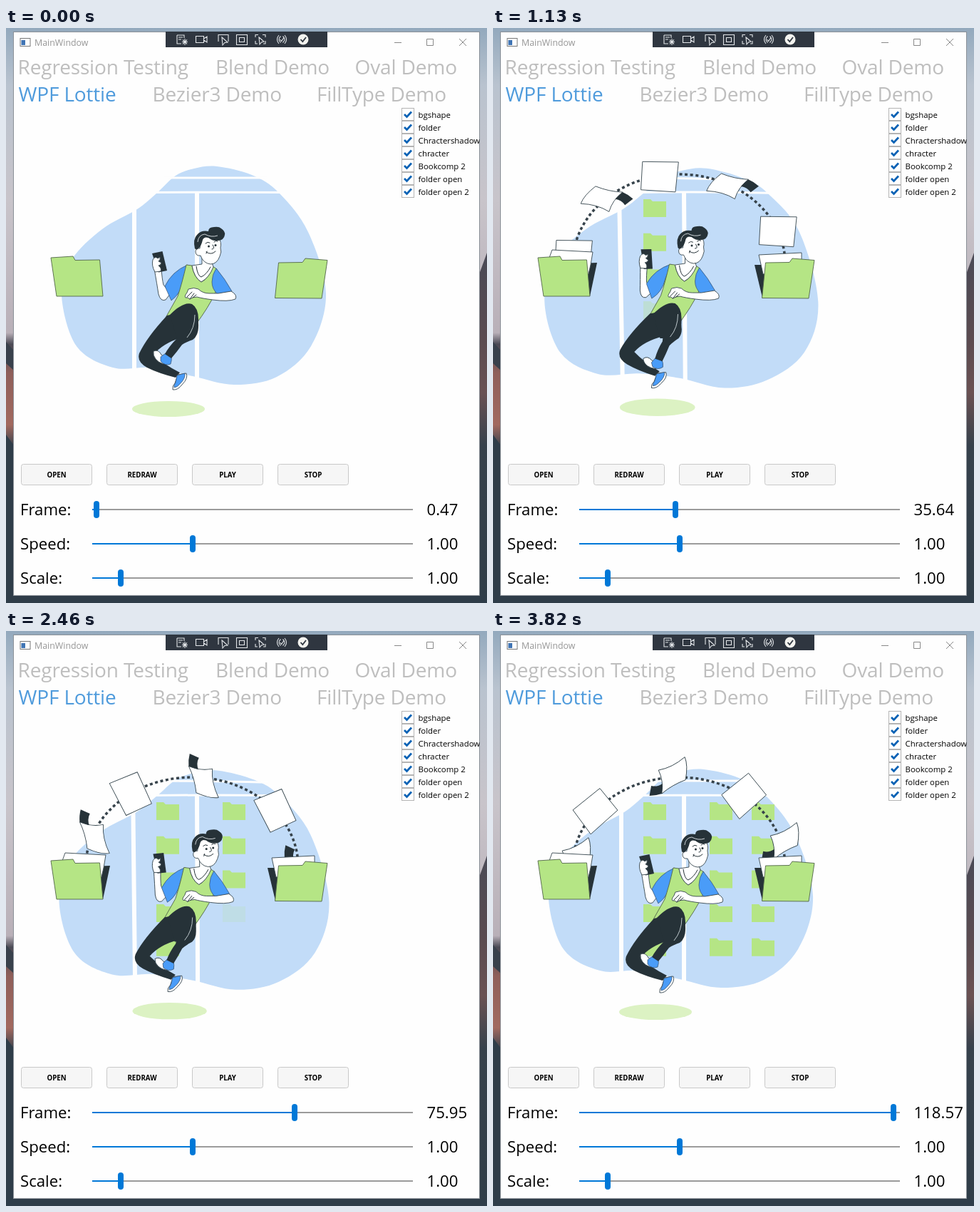
These frames come from a looping animation (675 by 806 pixels, 3.86 s). An HTML page:

```html
<!DOCTYPE html>
<html lang="en">
<head>
<meta charset="utf-8">
<title>MainWindow</title>
<style>
  html, body { margin: 0; width: 100%; height: 100%; overflow: hidden; }
  svg { display: block; width: 675px; height: 806px; font-family: "Open Sans", "Noto Sans", sans-serif; }
  .tab { font-size: 28px; letter-spacing: -.15px; fill: #bebebe; }
  .label { font-size: 22.2px; fill: #000; }
  .item { font-size: 11.4px; fill: #000; }
  .btn { font-size: 9.7px; font-weight: 700; fill: #000; text-anchor: middle; }
  .line { fill: none; stroke: #263238; stroke-width: 1; stroke-linecap: round; }
  .skin { fill: #fff; stroke: #37474f; stroke-width: .9; stroke-linejoin: round; }
  .green { fill: #b5e585; stroke: #52664a; stroke-width: .9; stroke-linejoin: round; }
  .blue { fill: #4a9cf8; stroke: #37506b; stroke-width: .7; stroke-linejoin: round; }
  .dark { fill: #263238; }
  .bar { fill: none; stroke: #fefefe; }
</style>
</head>
<body>
<svg viewBox="0 0 675 806">
  <defs>
    <linearGradient id="sky" x2="0" y2="1">
      <stop offset="0" stop-color="#93a9bd"/><stop offset=".1" stop-color="#b9c3cf"/>
      <stop offset=".3" stop-color="#c8c4ca"/><stop offset=".53" stop-color="#b9b0b8"/>
      <stop offset=".55" stop-color="#4b4a55"/><stop offset=".6" stop-color="#8f5f5a"/>
      <stop offset=".69" stop-color="#a2695f"/><stop offset=".73" stop-color="#34404c"/>
      <stop offset=".86" stop-color="#2c3f4d"/><stop offset="1" stop-color="#34444f"/>
    </linearGradient>
    <linearGradient id="ridge" x2="0" y2="1">
      <stop offset="0" stop-color="#4a4a56"/><stop offset=".25" stop-color="#5b4b50"/>
      <stop offset=".4" stop-color="#6a5153"/><stop offset=".55" stop-color="#36414c"/>
      <stop offset="1" stop-color="#2f3d48"/>
    </linearGradient>
    <g id="flat"><path class="skin" d="M-20,-26L22,-23L20.500,25.500L-19,24.500Z"/></g>
    <g id="curl">
      <path class="skin" d="M8,35Q-4,31 -17,15Q-10,-4 -10,-23Q2,-9 18,-5Q8,12 8,35Z"/>
      <path class="dark" d="M-10,-23Q-7,-31 -1,-38L8,-27Q1,-22 0,-13Q-5,-18 -10,-23Z"/>
    </g>
    <path id="mini" fill="#b5e585" d="M0,0H10L13,3H32V25H0Z"/>
    <clipPath id="win"><rect x="11" y="6" width="653.5" height="790"/></clipPath>
  </defs>

  <rect width="675" height="806" fill="url(#sky)"/>
  <path fill="url(#ridge)" d="M664,345L675,315V806H664Z"/>
  <path fill="#2f3d49" d="M0,570L11,585V806H0ZM0,796H675V806H0Z"/>
  <path fill="#39414c" d="M0,440L11,452V480L0,470Z"/>
  <rect x="10.5" y="5.5" width="654" height="790" fill="#fefefe" stroke="#8a9097"/>

  <rect x="20" y="14.5" width="14" height="11" fill="#fff" stroke="#777"/>
  <rect x="21.5" y="17" width="5.5" height="7" fill="#3f74b4"/>
  <text x="40" y="25" font-size="12.4" fill="#969696">MainWindow</text>
  <path fill="none" stroke="#888" d="M545,20.5H555M590.5,15.5H599.5V24.5H590.5ZM636,15L646,25M646,15L636,25"/>

  <rect x="224" y="5" width="227" height="22" fill="#2f3640"/>
  <g fill="none" stroke="#e2e5e8" stroke-width="1.1">
    <path d="M240,10H250V14M240,10V22H246M242,13H248M242,16H246M251,15V24M247,19.5H255M248,16.5L254,22.5M254,16.5L248,22.5"/>
    <path d="M266.5,11.5H277.5V20.5H266.5ZM277.5,15L282,12V20L277.5,17"/>
    <path d="M298,19V9.5H312V19M303,13L311,20L307,20.5L304,24Z"/>
    <path d="M323.5,9.5H338.5V23.5H323.5ZM327.5,13.5H334.5V19.5H327.5Z"/>
    <path d="M350,13V9.5H354M360,9.5H364V13M350,18V22H353M364,18V22H361M355,13L362,19L358.5,20L356,23Z"/>
    <path d="M383,10Q378,16 383,22M391,10Q396,16 391,22M385.500,11.500Q380.500,16 385.500,20.500M388.500,11.500Q393.500,16 388.500,20.500M384.500,16L386.500,18.500L390,13.500"/>
  </g>
  <circle cx="417" cy="16" r="7.5" fill="#f3f3ef"/>
  <path d="M413.500,16L416.300,19L421,13" fill="none" stroke="#2f3640" stroke-width="1.8"/>

  <g class="tab">
    <text x="16.500" y="65">Regression Testing</text><text x="294" y="65">Blend Demo</text><text x="489.500" y="65">Oval Demo</text>
    <text x="17.500" y="103" style="fill:#4f9bdc">WPF Lottie</text><text x="205.500" y="103">Bezier3 Demo</text><text x="436" y="103">FillType Demo</text>
  </g>

  <path id="blob" fill="#c2dcf8"/>
  <g id="shelf"></g>
  <path id="bars" class="bar" stroke-width="6"/>
  <path id="rails" class="bar" stroke-width="3"/>
  <path id="arc" fill="none" stroke="#37434b" stroke-width="3.500" stroke-dasharray="4 3.600"/>

  <path id="flapL" class="dark"/>
  <path id="flapR" class="dark"/>
  <g id="papers"></g>
  <path id="sheetL" class="skin" d="M79,322L83,311L140,314L137,332L134,345H81Z"/>
  <path id="sheetR" class="skin" d="M373,318L433,315V345H379Z"/>
  <path class="green" d="M63,322L94,320L97,325.500L131.500,325L136,376H71Z"/>
  <path class="green" d="M382.500,329L416,328.500L420,323L451,325.500L443,379L377.500,378.500Z"/>

  <ellipse id="shade" fill="#dcf2c3"/>

  <g id="body">
    <g id="arm">
      <g id="fore">
        <path class="skin" d="M208,337Q212,360 214,373Q217,384 224,381L231,372L221,360Q219,352 218,337Z"/>
        <path class="dark" d="M205,316L219.500,313L226,340L214,342.500Z"/>
        <path class="skin" d="M206,325Q209,319 213,323L216,321Q217,325 214,327L218,329Q217,333 214,333Q219,337 217,341L209,342Q204,333 206,325Z"/>
      </g>
      <path class="blue" d="M255,332Q233,341 223,362L232,382Q246,372 249,352Z"/>
    </g>
    <path class="green" d="M253,332Q247,358 241,376L224,406L266,416Q284,392 294,371Q292,350 296,338L290,334Q284,352 274,356Q264,350 261,333Z"/>
    <g id="backLeg">
      <path class="dark" d="M226,403Q198,433 187,456Q183,468 198,476Q214,484 238,490L244,483Q222,472 207,458Q220,442 246,434L262,395Z"/>
      <path class="skin" d="M241,486L253,484Q256,491 247,500Q241,508 234,507Q233,502 237,498Z"/>
      <path class="blue" d="M240,487L251,484Q252,491 245,498Q240,504 236,504Q235,501 238,497Z"/>
    </g>
    <g id="calf">
      <path class="skin" d="M207,453Q214,450 218,458L226,465L221,471Q214,469 210,464Q206,459 207,453Z"/>
      <path class="blue" d="M217,461L224,456L232,459Q233,466 231,471Q223,474 217,467Z"/>
      <path class="dark" d="M270,414Q271,431 262,437Q253,440 247,444Q239,455 232,463L223,457Q229,446 239,436L248,410Z"/>
    </g>
    <path class="dark" d="M230,402Q249,383 261,387Q271,393 270,412Q270,430 262,436L240,436Z"/>
    <path d="M265,402Q265,421 254,434" fill="none" stroke="#cfd8dc" stroke-width=".9"/>
    <path class="skin" d="M275,322V331L261,333Q264,350 274,356Q285,350 291,335L288,326Z"/>
    <path class="line" stroke-width=".8" d="M267,334Q269,348 274,349Q282,345 287,335"/>
    <path class="blue" d="M295,337Q307,351 317,369L297,373Q289,366 289,356Q289,346 295,337Z"/>
    <path class="skin" d="M298,372L316,369Q325,374 322,380Q312,384 290,381Q275,379 268,377Q262,377 258,380L255,378L252,378Q250,376 254,371L256,366Q264,363 270,366Q276,372 285,372Z"/>
    <path class="line" d="M254,377L261,370M258,380L264,372M262,378L267,374"/>
    <path class="skin" d="M274,292L298,294Q303,300 301,308Q303,314 300,320Q296,331 287,331Q277,330 273,319Q266,320 266,313Q267,308 272,309Z"/>
    <path class="dark" d="M265,309Q262,296 268,290Q274,283 284,285Q284,279 292,279Q299,278 302,281Q308,285 307,290Q306,297 298,298Q290,299 284,294Q278,292 276,297Q274,306 270,309Q267,312 265,309Z"/>
    <path d="M269,300Q270,290 279,289Q288,294 297,291" fill="none" stroke="#dfe5e8" stroke-width=".9"/>
    <path class="line" d="M280,302Q283,299 286,301M292,300Q295,297 297,299M290,304Q294,310 289,310M281,314Q288,319 294,313M282,313L281,316"/>
    <circle cx="284.500" cy="306" r="1.500" class="dark"/><circle cx="294" cy="304.500" r="1.500" class="dark"/>
  </g>

  <g id="ui" clip-path="url(#win)"></g>
</svg>
<script>
const LOOP = 3860, STEP = 40.6, LAST = 94;
const $ = id => document.getElementById(id);
const set = (id, attrs) => { for (const k in attrs) $(id).setAttribute(k, attrs[k]); };
const clamp = x => Math.max(0, Math.min(1, x));
const smooth = x => { x = clamp(x); return x * x * (3 - 2 * x); };
const mix = (a, b, u) => a + (b - a) * u;

// piecewise linear, extended past both ends
function interp(xs, ys, x) {
  let i = 0;
  while (i < xs.length - 2 && x > xs[i + 1]) i++;
  return mix(ys[i], ys[i + 1], (x - xs[i]) / (xs[i + 1] - xs[i]));
}

// check list, buttons and sliders
const names = ['bgshape', 'folder', 'Chractershadow', 'chracter', 'Bookcomp 2', 'folder open', 'folder open 2'];
let ui = names.map((n, i) => `<g transform="translate(0 ${i * 18})">
  <rect x="555.5" y="112.5" width="17" height="17" fill="#fff" stroke="#b4b4b4"/>
  <path d="M559,121L562.5,124.500L569,117.500" fill="none" stroke="#0a62b5" stroke-width="2.800"/>
  <text class="item" x="578.5" y="126">${n}</text></g>`).join('');
ui += ['OPEN', 'REDRAW', 'PLAY', 'STOP'].map((n, i) => `<g transform="translate(${i * 120} 0)">
  <rect x="21.5" y="611.5" width="99" height="29" rx="3" fill="#f6f6f6" stroke="#c9c9c9"/>
  <text class="btn" x="71" y="630">${n}</text></g>`).join('');
ui += [['Frame', 127, 675], ['Speed', 262, 723], ['Scale', 161, 771]].map(([n, x, y]) => `
  <text class="label" x="20" y="${y + 8}">${n}:</text>
  <path d="M121,${y}H571" stroke="#9b9b9b" stroke-width="2"/>
  <path id="fill${n}" d="M121,${y}H${x}" stroke="#0078d7" stroke-width="2"/>
  <rect id="thumb${n}" x="${x - 4}" y="${y - 12}" width="8" height="24" rx="4" fill="#0078d7"/>
  <text class="label" id="value${n}" x="590.5" y="${y + 8}">1.00</text>`).join('');
$('ui').innerHTML = ui;

// shelf folders fill column by column
const minis = [];
[211, 304, 363].forEach(x => {
  for (let r = 0; r < 5; r++) minis.push(`<use href="#mini" x="${x}" y="${240 + r * 47.7}"/>`);
});
$('shelf').innerHTML = minis.join('');
const miniStart = minis.map((_, n) => interp([1, 3, 5, 7, 9, 14], [18.3, 33.8, 51.6, 65.2, 84.8, 112], n));

// launch time of each sheet, alternately curled and flat
const launch = [-26.4, -11.5, 0, 12, 21.8, 33.9, 47.5, 59.7, 69.5, 80.5, 93.3, 107.2, 117];
$('papers').innerHTML = launch.map((_, i) => `<use href="#${i % 2 ? 'flat' : 'curl'}"/>`).join('');

// outline at rest and fully swollen: x, y, x, y
const outline = [
  [296, 194, 300, 197], [345, 206, 352, 211], [383, 231, 386, 232], [424, 286, 430, 285],
  [449, 372, 457, 385], [428, 446, 438, 455], [380, 489, 385, 494], [320, 500, 325, 505],
  [262, 488, 262, 491], [205, 476, 205, 485], [150, 476, 148, 486], [99, 446, 95, 457],
  [78, 375, 72, 388], [92, 325, 85, 325], [135, 282, 130, 282], [184, 254, 182, 254],
  [212, 231, 212, 231], [238, 207, 238, 210], [264, 197, 266, 200]];

function closedCurve(p) {
  const n = p.length, at = i => p[(i + n) % n];
  let d = `M${p[0]}`;
  for (let i = 0; i < n; i++) {
    const [a, b, c, e] = [at(i - 1), at(i), at(i + 1), at(i + 2)];
    const h1 = b.map((v, k) => v + (c[k] - a[k]) / 6);
    const h2 = c.map((v, k) => v - (e[k] - b[k]) / 6);
    d += `C${h1} ${h2} ${c}`;
  }
  return d + 'Z';
}

// flight path; past either end it drops straight into the folder
function flight(deg) {
  const a = Math.max(0, Math.min(180, deg)) * Math.PI / 180;
  return [261 + 149 * Math.cos(a), 330 - 125 * Math.sin(a) + 2 * Math.max(0, deg - 180, -deg)];
}

function draw(ms) {
  const k = Math.min(LAST, Math.floor(ms / STEP + .3));
  const f = interp([0, 16, 28, 43, 53, 69, 94], [.47, 20.64, 35.64, 54.40, 67.10, 87.33, 118.57], k);
  const s = (1 - Math.cos(f * Math.PI / 30)) / 2;

  set('blob', { d: closedCurve(outline.map(p => [mix(p[0], p[2], s), mix(p[1], p[3], s)])) });
  set('bars', { d: `M${180 - 3 * s},245L${180 + 2 * s},495M268,230L${268 + 2 * s},502` });
  set('rails', { d: `M222,210Q290,${210 + s} 368,${210 + 4 * s}M202,230.500Q300,${230 - s} 396,${230.5 + s}` });
  set('shade', { cx: 228 + 3 * s, cy: 534 - 2.5 * s, rx: 51 + 2 * s, ry: 11 + 1.3 * s });

  const turn = (id, deg, x, y) => set(id, { transform: `rotate(${deg * s} ${x} ${y})` });
  set('body', { transform: `translate(${-6 * s} ${-s})` });
  turn('backLeg', 3.6, 258, 400);
  turn('calf', -15, 259, 420);
  turn('arm', 5, 255, 335);
  turn('fore', 6, 222, 380);

  [...$('shelf').children].forEach((m, n) => m.setAttribute('opacity', clamp((f - miniStart[n]) / 6)));

  const open = smooth((f - 1) / 7);
  ['flapL', 'flapR', 'sheetL', 'sheetR'].forEach(id => { $(id).style.display = open ? '' : 'none'; });
  set('flapL', { d: `M120,330L${132 + 14 * open},${331 - 2 * open}L136,376Z` });
  set('flapR', { d: `M395,332L${382 - 15 * open},332L378,378Z` });
  set('sheetL', { transform: `translate(0 ${16 * (1 - open)})` });
  set('sheetR', { transform: `translate(0 ${14 * (1 - open)})` });

  const spread = smooth((f - 3) / 14);
  set('arc', { d: `M${flight(175)}A149,125 0 0 1 ${flight(175 - 170 * spread)}`, opacity: spread ? 1 : 0 });
  [...$('papers').children].forEach((p, i) => {
    const deg = 180 - 3.36 * (f - launch[i]) * spread;
    const on = spread > 0 && deg < 188 && deg > -8;
    p.style.display = on ? '' : 'none';
    p.setAttribute('transform', `translate(${flight(deg)}) rotate(${6 * f - 122})`);
  });

  const x = Math.round(125.1 + 3.683 * f);
  set('thumbFrame', { x: x - 4 });
  set('fillFrame', { d: `M121,675H${x}` });
  $('valueFrame').textContent = f.toFixed(2);
}

const start = performance.now();
function tick() {
  draw((performance.now() - start) % LOOP);
  requestAnimationFrame(tick);
}
tick();
</script>
</body>
</html>
```
